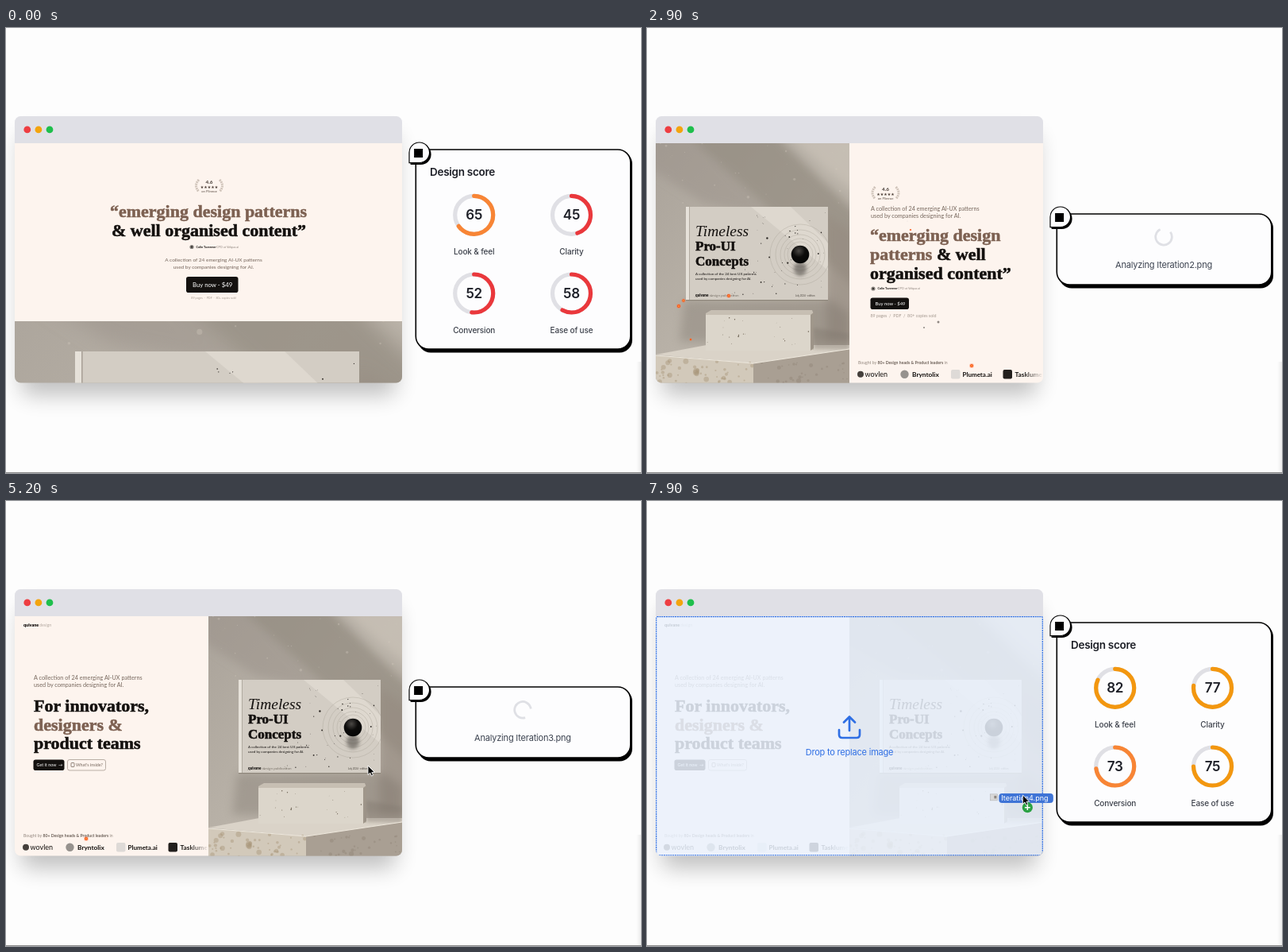
Recreate the animation shown at these times as an HTML page. Size 800 by 560 pixels, loop 8000 ms.

```html
<!DOCTYPE html>
<html lang="en">
<head>
<meta charset="utf-8">
<title>Design score</title>
<style>
  html, body { margin: 0; width: 800px; height: 560px; overflow: hidden; background: #fdfdfd; }
  svg { display: block; }
  text { white-space: pre; }
  .ui { font-family: Inter, "Open Sans", sans-serif; }
  .body { font-family: Lato, "Open Sans", sans-serif; }
  .display { font-family: "Liberation Serif", "Noto Serif", serif; font-weight: 700; stroke: currentColor; stroke-width: .55px; }
  .cover { font-family: "Liberation Serif", "Noto Serif", serif; }
</style>
</head>
<body>
<svg id="stage" width="800" height="560" viewBox="0 0 800 560"></svg>
<script>
const LOOP = 8000;
const INK = '#14110f', BROWN = '#7d6152', CREAM = '#fdf4ee', BLUE = '#2f6fe4';

// Drop times, result times and scores of each iteration
const SCORES = [[65, 45, 52, 58], [75, 63, 61, 67], [82, 77, 73, 75]];
const RUNS = [
  { drop: 1300, done: 3570, dotDelay: 600, mirror: true },
  { drop: 4850, done: 7000, dotDelay: 200, mirror: false }
];
const DRAGS = [
  { file: 2, start: 100, end: 1200, drop: 1300, from: [697, 434], to: [425, 370], label: -36, away: [2000, 2700, 698, 428] },
  { file: 3, start: 3800, end: 4770, drop: 4850, from: [830, 475], to: [456, 333], label: -36, away: [5230, 5450, 812, 470] },
  { file: 4, start: 7300, end: 7960, drop: 9000, from: [835, 495], to: [465, 367], label: -30 }
];
// x, y, radius, is orange
const DOTS = [
  [101, 425, 2, 1], [407, 337, 1.9, 1], [464, 343, 1.7, 1], [470, 350, 2, 1], [143, 370, 1.5, 0],
  [455, 392, 1.2, 1], [161, 377, 1, 0], [178, 254, .9, 1], [182, 243, .6, 0]
];

function random(seed) {
  return () => {
    seed = (seed * 1664525 + 1013904223) % 4294967296;
    return seed / 4294967296;
  };
}
const clamp = v => Math.max(0, Math.min(1, v));
const smooth = v => (v = clamp(v), v * v * (3 - 2 * v));
const mix = (a, b, p) => a + (b - a) * p;
const esc = s => s.replace(/&/g, '&amp;');

const text = (kind, x, y, size, str, fill, extra = '') =>
  `<text class="${kind}" x="${x}" y="${y}" font-size="${size}" fill="${fill}" ${extra}>${esc(str)}</text>`;
const body = (...a) => text('body', ...a);
const ui = (...a) => text('ui', ...a);
const title = (x, y, str, fill) => text('display', x, y, 22, str, fill, `color="${fill}"`);
const rect = (x, y, w, h, fill, extra = '') =>
  `<rect x="${x}" y="${y}" width="${w}" height="${h}" fill="${fill}" ${extra}/>`;
const circle = (x, y, r, fill, extra = '') => `<circle cx="${x}" cy="${y}" r="${r}" fill="${fill}" ${extra}/>`;
const path = (d, fill, extra = '') => `<path d="${d}" fill="${fill}" ${extra}/>`;
const MID = 'text-anchor="middle"', BOLD = 'font-weight="700"';

function speckles(seed, n, x, y, w, h, size, fill, extra) {
  const rnd = random(seed);
  let out = '';
  for (let i = 0; i < n; i++)
    out += circle((x + rnd() * w).toFixed(1), (y + rnd() * h).toFixed(1), (size * (.25 + rnd() * rnd())).toFixed(2), fill, extra);
  return out;
}

// Book on a stone plinth, 244 x 302
function scene() {
  const rings = [16, 20, 25, 31, 38].map(r => circle(182, 140, r, 'none', 'stroke="#a39c92" stroke-width=".35"')).join('');
  return `<g id="scene" clip-path="url(#sceneClip)">
    ${rect(0, 0, 244, 302, 'url(#wall)')}
    <g filter="url(#soft)">
      ${path('M40 -10H150L260 95V190L170 110Z', '#8f877c', 'opacity=".65"')}
      ${path('M165 -10H260V70Z', '#c9c1b6', 'opacity=".8"')}
      ${path('M-10 -10H40L150 95L60 75L-10 30Z', '#99928a', 'opacity=".5"')}
      ${path('M215 90L260 120V250H215Z', '#948b80', 'opacity=".6"')}
    </g>
    ${speckles(8, 26, 0, 0, 244, 75, 1.6, '#d0c8bd', 'opacity=".35"')}
    ${path('M36 198H222L244 214V250H30Z', '#70685e', 'opacity=".3" filter="url(#soft)"')}
    ${rect(38, 80, 179, 118, '#d3cdc4')}
    ${path('M120 80H170L217 125V160Z', '#e3ddd4', 'opacity=".7"')}
    ${rect(38, 80, 4, 118, '#e6e1d9')}${rect(42, 80, .8, 118, '#a9a298')}
    ${rect(38, 197, 179, 1.2, '#8e867b')}
    ${rings}
    ${speckles(31, 46, 112, 84, 102, 98, 1.1, '#2b2723')}
    ${speckles(5, 8, 44, 186, 110, 9, 1, '#2b2723')}
    <ellipse cx="182" cy="158" rx="8" ry="9" fill="#4a453f" opacity=".55" filter="url(#blur)"/>
    ${circle(182, 140, 11.3, 'url(#ball)')}
    ${text('cover', 50, 117, 19.5, 'Timeless', INK, 'font-style="italic"')}
    ${text('display', 50, 135, 17, 'Pro-UI', INK, `color="${INK}"`)}
    ${text('display', 50, 154, 17, 'Concepts', INK, `color="${INK}"`)}
    ${body(50, 166, 4.5, 'A collection of the 24 best UX patterns', INK)}
    ${body(50, 172, 4.5, 'used by companies designing for AI.', INK)}
    ${body(50, 193, 4.6, 'quivane', INK, 'font-weight="900"')}
    ${body(68, 193, 4.6, 'design publication', '#7b746b')}
    ${body(176, 193, 3, 'July 2024 · edition', '#4d4740')}
    ${path('M0 266L64 254H244V260L123 277Z', '#dad3c8')}
    ${path('M63 214L70 210H197L199 215V260H63Z', '#c7bfb3')}
    ${rect(63, 216, 132, 45, '#dcd6cb')}
    ${path('M195 216L199 213V258L195 261Z', '#a0978b')}
    ${speckles(17, 22, 64, 217, 130, 43, 1.1, '#6d6253')}
    ${path('M199 232L244 240V260L199 259Z', '#80776d', 'opacity=".4" filter="url(#blur)"')}
    ${path('M0 267L123 277V302H0Z', '#d2c9ba')}
    ${speckles(23, 46, 0, 272, 122, 30, 4, '#a28f71', 'opacity=".4"')}
    ${path('M123 277L244 259V302H123Z', '#a99f93')}
    ${speckles(29, 30, 124, 276, 120, 26, 3, '#8c8174', 'opacity=".4"')}
    ${path('M0 267L123 277L244 259', 'none', 'stroke="#eee8dd" stroke-width="1"')}
  </g>`;
}

const rating = (x, y) => `<g transform="translate(${x} ${y})">
  ${path('M-13 -7Q-20 0 -13 8M13 -7Q20 0 13 8', 'none', 'stroke="#cfc3b9" stroke-width="3" stroke-dasharray="2 .8"')}
  ${body(0, -1.6, 6.4, '4.6', '#3d332d', MID + BOLD)}
  <text x="0" y="4" font-size="5" font-family="DejaVu Sans, sans-serif" fill="#4a3d35" text-anchor="middle">★★★★★</text>
  ${body(0, 8.6, 4.2, 'on Plimroe', '#5d5048', MID)}</g>`;

const author = (x, y) => circle(x, y, 2.6, '#8a8580') + circle(x, y, 1.2, '#3b3733') +
  body(x + 5.5, y + 1.4, 3.8, 'Colin Tavermer', INK, BOLD) + body(x + 31, y + 1.4, 3.8, 'CPO at Velquo.ai', '#8f857e');

const button = (x, y, w, h, tx, ty, size, str) =>
  rect(x, y, w, h, INK, 'rx="2.8"') + body(tx, ty, size, str, '#fff');

const buyers = dx => `<g transform="translate(${dx} 0)">
  ${body(266, 422.5, 5.15, 'Bought by', '#94887f')}
  ${body(290.5, 422.5, 5.15, '80+ Design heads & Product leaders', '#6e625a', BOLD)}
  ${body(374.5, 422.5, 5.15, 'in', '#94887f')}
  ${circle(269, 435.8, 4, '#45403c')}${body(274.5, 438.8, 9, 'wovlen', INK)}
  ${circle(324.5, 435.8, 5.2, '#96928e')}${body(334, 438.6, 8.3, 'Bryntolix', INK, BOLD)}
  ${rect(383, 430, 11.5, 11.5, '#dedad7', 'rx="2"')}${body(397.5, 438.6, 8, 'Plumeta.ai', INK, BOLD)}
  ${rect(448.5, 430, 11.5, 11.5, '#221f1d', 'rx="2"')}${body(463.5, 438.6, 8.3, 'Tasklume', INK, BOLD)}
  ${rect(474, 428, 25, 17, 'url(#fade)')}</g>`;

const LINE1 = 'A collection of 24 emerging AI-UX patterns', LINE2 = 'used by companies designing for AI.';
const intro = (x, y, size, gap, extra = '') =>
  body(x, y, size, LINE1, '#76675d', extra) + body(x, y + gap, size, LINE2, '#76675d', extra);

const pages = [
  rect(11, 145, 488, 225, CREAM) + rating(256, 198) +
  title(131, 238, '“emerging design patterns', BROWN) + title(133, 261.5, '& well organised content”', INK) +
  author(234, 275.5) + intro(261.5, 294, 6.5, 9, MID) +
  button(227, 313, 65.5, 20, 235, 325.8, 7.8, 'Buy now - $49') +
  body(261.5, 341.2, 3.7, '89 pages  ·  PDF  ·  80+ copies sold', '#a89c94', MID) +
  '<g clip-path="url(#lower)"><use href="#scene" transform="translate(11 247) scale(2)"/></g>',

  rect(255, 145, 244, 302, CREAM) + '<use href="#scene" x="11" y="145"/>' + rating(300.5, 207) +
  intro(282, 229.5, 7.25, 9.5) +
  title(281, 268, '“emerging design', BROWN) + title(281, 292, 'patterns', BROWN) +
  title(365, 292, '& well', INK) + title(281, 315.5, 'organised content”', INK) +
  author(285, 328) + button(281.5, 339.5, 48.5, 14.5, 287.5, 349, 5.9, 'Buy now - $49') +
  body(281.5, 364.4, 5.3, '89 pages  /  PDF  /  80+ copies sold', '#a3978e') + buyers(0),

  rect(11, 145, 244, 302, CREAM) + '<use href="#scene" x="255" y="145"/>' +
  body(22, 158, 5.4, 'quivane', INK, 'font-weight="900"') + body(42, 158, 5.4, 'design', '#b5aaa2') +
  intro(35, 224.5, 7.25, 9.5) +
  title(35, 265, 'For innovators,', INK) + title(35, 288.5, 'designers &', BROWN) + title(35, 311.5, 'product teams', INK) +
  button(34.5, 325.5, 39, 13.5, 38.5, 334.2, 5.4, 'Get it now  →') +
  rect(77.5, 325.5, 48, 13.5, 'none', 'rx="2.5" stroke="#a99c93" stroke-width=".8"') +
  rect(82, 329.5, 4, 5, 'none', 'rx=".6" stroke="#76675d" stroke-width=".8"') +
  body(88, 334.2, 5.4, "What's inside?", '#76675d') + buyers(-244)
];

const GAUGES = [['Look & feel', 589.7, 235.3], ['Clarity', 712.5, 235.3], ['Conversion', 589.7, 334], ['Ease of use', 712.5, 334]];
const ringColor = v => v < 60 ? '#ea383c' : v < 75 ? '#f88535' : '#f3970f';

const scores = set => ui(534, 185.5, 13.5, 'Design score', '#1d1f27', 'font-weight="600" letter-spacing="-.28"') +
  GAUGES.map(([name, x, y], i) => {
    const v = set[i], ring = `stroke-width="5.2"`;
    return circle(x, y, 24, 'none', `stroke="#e0e0e5" ${ring}`) +
      circle(x, y, 24, 'none', `stroke="${ringColor(v)}" ${ring} stroke-linecap="round" pathLength="100" stroke-dasharray="${v} 100" transform="rotate(-90 ${x} ${y})"`) +
      ui(x, y + 6.1, 17, String(v), '#1d1f27', MID + ' font-weight="600" letter-spacing="-.2"') +
      ui(x, y + 49.6, 10, name, '#3c404a', MID + ' font-weight="500" letter-spacing="-.15"');
  }).join('');

const stage = document.getElementById('stage');
stage.innerHTML = `<defs>
  <clipPath id="sceneClip"><rect width="244" height="302"/></clipPath>
  <clipPath id="lower"><rect x="11" y="369" width="488" height="78"/></clipPath>
  <clipPath id="frame"><rect x="11" y="111" width="488" height="335.5" rx="7.5"/></clipPath>
  <linearGradient id="wall" x2="1" y2="1"><stop stop-color="#aaa39a"/><stop offset=".5" stop-color="#b9b2a8"/><stop offset="1" stop-color="#b0a79c"/></linearGradient>
  <radialGradient id="ball" cx=".42" cy=".3" r=".7"><stop stop-color="#4b4845"/><stop offset=".5" stop-color="#0d0c0b"/><stop offset="1" stop-color="#050505"/></radialGradient>
  <linearGradient id="fade"><stop stop-color="${CREAM}" stop-opacity="0"/><stop offset="1" stop-color="${CREAM}"/></linearGradient>
  <linearGradient id="edge"><stop stop-color="#000" stop-opacity="0"/><stop offset="1" stop-color="#000" stop-opacity=".07"/></linearGradient>
  <filter id="soft" x="-20%" y="-20%" width="140%" height="140%"><feGaussianBlur stdDeviation="6"/></filter>
  <filter id="blur" x="-50%" y="-50%" width="200%" height="200%"><feGaussianBlur stdDeviation="2"/></filter>
  <filter id="drop" x="-20%" y="-20%" width="140%" height="150%"><feGaussianBlur stdDeviation="14"/></filter>
  ${scene()}
</defs>
${rect(0, 0, 800, 560, '#fdfdfd')}
${rect(794, 420, 6, 139, 'url(#edge)')}${rect(0, 559, 800, 1, '#8c8c8c')}
${rect(19, 134, 472, 328, '#000', 'rx="10" opacity=".24" filter="url(#drop)"')}
<g clip-path="url(#frame)">
  ${rect(11, 111, 488, 34, '#e0e0e6')}
  ${['#ee3e42', '#f3a40e', '#1fbf4c'].map((c, i) => circle(26.8 + i * 14.1, 127.9, 4.4, c)).join('')}
  ${pages.map(p => `<g class="page">${p}</g>`).join('')}
  <g id="dots"></g>
  <g id="overlay">
    ${rect(11, 145, 488, 302, '#ebf3fe', 'opacity=".86"')}
    ${rect(11.7, 145.7, 486.6, 300.2, 'none', `rx="1" stroke="${BLUE}" stroke-width="1.2" stroke-dasharray="2 .8"`)}
    ${path('M255 289V272M248 278.5L255 271.5L262 278.5M242 288V294Q242 298 246 298H264Q268 298 268 294V288', 'none', `stroke="${BLUE}" stroke-width="2.7" stroke-linecap="round" stroke-linejoin="round"`)}
    ${ui(255, 320, 11, 'Drop to replace image', BLUE, MID + ' letter-spacing="-.2"')}
  </g>
</g>
<rect id="shade" x="519" width="270" rx="16" fill="#000"/>
<rect id="card" x="516.3" width="270.5" rx="16" fill="#fdfdfe" stroke="#000" stroke-width="1.6"/>
<g id="busy">
  ${circle(651, 262.8, 10.3, 'none', 'id="spin" stroke="#dfe0e5" stroke-width="2.8" pathLength="100" stroke-dasharray="78 22"')}
  <text id="status" class="ui" x="651" y="302" font-size="11" fill="#3c4350" text-anchor="middle" letter-spacing="-.2"></text>
</g>
${SCORES.map(s => `<g class="scores">${scores(s)}</g>`).join('')}
<g id="badge">
  ${path('M-11 14V2A13 13 0 1 1 2 15H-11Z', '#000')}
  ${path('M-12.6 12.6V0A12.8 12.8 0 1 1 0 12.6Z', '#fdfdfe', 'stroke="#000" stroke-width="1.2"')}
  ${rect(-6.5, -5, 11, 11, '#000')}
</g>
<g id="drag">
  <g id="pill">
    ${rect(-11, -1, 9, 8, '#d8d8d8', 'stroke="#aaa" stroke-width=".5"')}${rect(-6, 1, 3, 3.5, '#8e8780')}
    ${rect(0, -2, 68.5, 12, '#3f74d6', 'rx="4"')}
    <text id="name" class="ui" x="3" y="7.3" font-size="9" fill="#fff" letter-spacing="-.02"></text>
  </g>
  ${circle(6, 15.8, 6.6, '#2ba143')}${path('M6 12.4V19.2M2.6 15.8H9.4', 'none', 'stroke="#fff" stroke-width="1.5"')}
</g>
${path('M0 0V11.6L2.7 9.1L4.5 13L6.5 12.1L4.8 8.4H8.4Z', '#000', 'id="cursor" stroke="#fff" stroke-width=".9"')}`;

const $ = id => document.getElementById(id);
const set = (el, name, value) => el.setAttribute(name, value);
const show = (el, on) => { el.style.display = on ? '' : 'none'; };
const pageEls = [...stage.querySelectorAll('.page')], scoreEls = [...stage.querySelectorAll('.scores')];

function dot(x, y, r, orange, a) {
  if (!orange) return circle(x, y, r, '#8f8782', `opacity="${a}"`);
  return `<g opacity="${a}">${circle(x, y, r * 1.5, '#ff7a3c', 'opacity=".35"')}${circle(x, y, r, '#f8501c')}${circle(x, y, r * .4, '#ffd04a')}</g>`;
}

function drawDots(t, run) {
  if (!run || t >= run.done) return '';
  const age = t - run.drop;
  let out = '';
  DOTS.forEach(([x, y, r, orange], i) => {
    const born = i ? 700 + 110 * i : run.dotDelay;
    const a = clamp((age - born) / 120);
    if (a > 0) out += dot(run.mirror ? 510 - x : x, y, r, orange, a);
  });
  // brief sparks across the page
  const rnd = random(run.drop);
  for (let i = 0; i < 18; i++) {
    const x = 44 + rnd() * 440, y = 165 + rnd() * 260, born = 620 + rnd() * 700, orange = rnd() < .6;
    const p = (age - born) / 300;
    if (p > 0 && p < 1) out += dot(x, y, 1.5, orange, Math.sin(p * Math.PI));
  }
  return out;
}

function drawPointer(t) {
  let x, y, d = DRAGS.find(d => t >= d.start && t < d.drop);
  show($('drag'), d);
  if (d) {
    const p = smooth((t - d.start) / (d.end - d.start));
    x = mix(d.from[0], d.to[0], p);
    y = mix(d.from[1], d.to[1], p);
    set($('drag'), 'transform', `translate(${x} ${y})`);
    set($('pill'), 'transform', `translate(${d.label} 0)`);
    $('name').textContent = `Iteration${d.file}.png`;
  }
  show($('overlay'), d && x < 499 && y < 447);
  const left = DRAGS.find(d => d.away && t >= d.drop && t < d.away[1]);
  if (left) {
    const [a, b, ax, ay] = left.away, p = smooth((t - a) / (b - a));
    x = mix(left.to[0], ax, p);
    y = mix(left.to[1], ay, p);
  }
  show($('cursor'), d || left);
  if (d || left) set($('cursor'), 'transform', `translate(${x} ${y})`);
}

function draw(t) {
  const step = RUNS.filter(r => t >= r.drop).length, run = RUNS[step - 1];
  const open = !run ? 1 : t < run.done ? 1 - smooth((t - run.drop) / 150) : clamp((t - run.done) / 130);
  const top = mix(234, 153, open), height = mix(89, 251, open);

  pageEls.forEach((el, i) => show(el, i === step));
  const shown = run && t < run.done ? step - 1 : step;
  scoreEls.forEach((el, i) => {
    show(el, i === shown && open > .5);
    el.style.opacity = clamp(open * 2 - 1);
  });
  set($('card'), 'y', top);
  set($('card'), 'height', height);
  set($('shade'), 'y', top + 2);
  set($('shade'), 'height', height + 2.5);
  set($('badge'), 'transform', `translate(520.6 ${top + 4})`);
  $('busy').style.opacity = clamp(1 - open * 2);
  $('status').textContent = `Analyzing Iteration${step + 1}.png`;
  set($('spin'), 'transform', `rotate(${t * .36 % 360} 651 262.8)`);
  $('dots').innerHTML = drawDots(t, run);
  drawPointer(t);
}

const begin = performance.now();
function tick() {
  draw((performance.now() - begin) % LOOP);
  requestAnimationFrame(tick);
}
tick();
</script>
</body>
</html>
```
